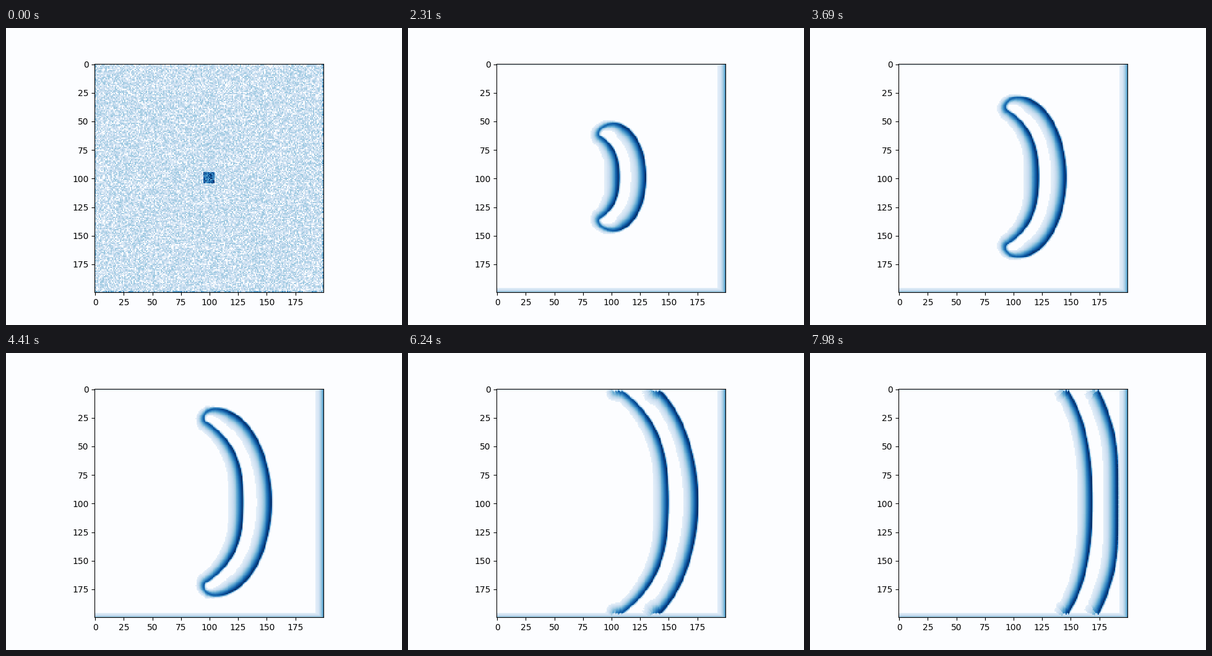
Write a matplotlib script that moves like this. It is 640 px wide and 480 px high and loops after 8000 ms.

```python
import numpy as np
import matplotlib.pyplot as plt
from matplotlib.animation import FuncAnimation
from matplotlib.colors import ListedColormap

N = 200
FRAMES, INTERVAL = 250, 32
STEP_MS = 30          # one simulation step
MID = 99.5            # mirror line of the wave
WALL = 3.0            # the wave flattens this close to the top
RIGHT = 191.8         # the wave stalls here
X0 = 60               # nothing of the wave lies further left
BACK = "#fcfdff"

rng = np.random.default_rng(7)
cells = np.arange(N) + 0.5
gx, gy = np.meshgrid(cells, cells)
hx, hy = np.meshgrid(cells[X0:], cells[:100])
half = np.column_stack([hx.ravel(), hy.ravel()])

# Starting state: noise, rough borders and a dense seed square
noise = rng.uniform(0, 0.37, (N, N))
noise[:, [0, -1]] = rng.uniform(0.1, 0.65, (N, 2))
noise[-1] = rng.uniform(0.1, 0.65, N)
start = noise.copy()
start[95:105, 95:105] = rng.uniform(0.5, 1.0, (10, 10))

# Steady glow along the borders
border = np.maximum.reduce([
    0.62 * np.exp(-(N - gx) / 3.1),
    0.45 * np.exp(-(N - gy) / 2.0),
    0.20 * np.exp(-gy / 1.5),
])
reach = np.maximum(abs(gx - 100), abs(gy - 100))

theta = np.linspace(0, np.pi / 2, 60)
bez = np.linspace(0, 1, 16)[:, None]
w = np.linspace(1, 0, 54)
along = np.concatenate([np.linspace(0, 1, 60), np.linspace(1, 2, 16),
                        np.linspace(2, 3, 54)])
KNOTS = [0, 0.8, 1, 1.5, 2, 2.3, 3]
inside = np.interp(along, KNOTS, [6.6, 6.2, 4.2, 1.7, 1.0, 0.8, 0.8])
outside = np.interp(along, KNOTS, [0.8, 0.9, 1.2, 2.8, 4.4, 5.8, 6.6])
strength = np.interp(along, KNOTS, [1, 1, 0.85, 0.78, 0.85, 1, 1])


def crest(t):
    """Upper half of the ring: outer arc, rounded tip, inner arc."""
    h = 8.5 + 0.5 * t + 0.002 * max(t - 190, 0)**2
    g = max(h - 11, 0.35 * h)
    outer = 104 + 0.345 * t
    inner = 81.9 + 0.328 * t
    cx = outer - 0.59 * h
    k = min(1, h / 40)

    arc = np.column_stack([cx + 0.59 * h * np.cos(theta),
                           MID - h * np.sin(theta)])
    tail = np.column_stack([inner - g * (0.17 * w**2 + 0.30 * w**4),
                            MID - g * w])
    a, d = arc[-1], tail[0]
    b = a + (-9 * k, 0)
    c = d + (-3.6 * k, -3.6 * k)
    tip = ((1 - bez)**3 * a + 3 * bez * (1 - bez)**2 * b
           + 3 * bez**2 * (1 - bez) * c + bez**3 * d)
    return np.vstack([arc, tip, tail])


def glow(pts, normal, amp, l_in, l_out):
    """Brightness around a piece of the crest, with its own slope per side."""
    near = np.argmin((pts**2).sum(1) - 2 * half @ pts.T, axis=1)
    off = half - pts[near]
    s = (off * normal[near]).sum(1)
    side = np.sqrt(np.maximum((off**2).sum(1) - s**2, 0))
    dist = np.hypot(s, np.maximum(side - 1.5, 0))
    length = np.where(s > 0, l_in[near], l_out[near])
    return amp[near] * np.exp(-(dist / length)**1.5)


def wave(t):
    pts = crest(t)
    # Slow down smoothly at the right limit
    pts[:, 0] -= 1.5 * np.logaddexp(0, (pts[:, 0] - RIGHT) / 1.5)
    tan = np.gradient(pts, axis=0)
    normal = np.column_stack([tan[:, 1], -tan[:, 0]])
    normal /= np.hypot(*normal.T)[:, None] + 1e-9

    # Flatten and fade at the top wall
    depth = np.maximum(WALL - pts[:, 1], 0)
    amp = strength * np.exp(-(depth / 8)**2)
    pts[:, 1] += np.minimum(depth, 6)

    value = np.zeros(len(half))
    for part in (along <= 1.6, along >= 1.4):
        m = part & (amp > 0.02)
        if m.any():
            value = np.maximum(value, glow(pts[m], normal[m], amp[m],
                                           inside[m], outside[m]))
    top = value.reshape(hx.shape)
    out = np.zeros((N, N))
    out[:100, X0:] = top
    out[100:199, X0:] = top[98::-1]
    return out


def field(i):
    if i == 0:
        return start
    t = i * INTERVAL / STEP_MS
    out = np.maximum(wave(t) * np.clip((t - 3) / 10, 0, 1),
                     border * min(1, t / 15))
    if t < 20:
        haze = 0.2 * np.exp(-t / 4) + (noise - 0.2) * np.exp(-1.2 * t)
        seed = 0.85 * np.exp(-(reach / (5 + 0.3 * t))**4) * max(0, 1 - t / 16)
        out = np.maximum.reduce([out, haze, seed])
    return out


cmap = ListedColormap(plt.get_cmap("Blues")(np.linspace(0.1, 1, 128)))
cmap.set_under(BACK)

fig, ax = plt.subplots(figsize=(6.4, 4.8), dpi=100, facecolor=BACK)
image = ax.imshow(start, cmap=cmap, vmin=0.065, vmax=1,
                  interpolation="nearest")


def update(i):
    image.set_data(field(i))
    return [image]


anim = FuncAnimation(fig, update, frames=FRAMES, interval=INTERVAL,
                     init_func=lambda: update(0), repeat=True, repeat_delay=0)
plt.show()
```
